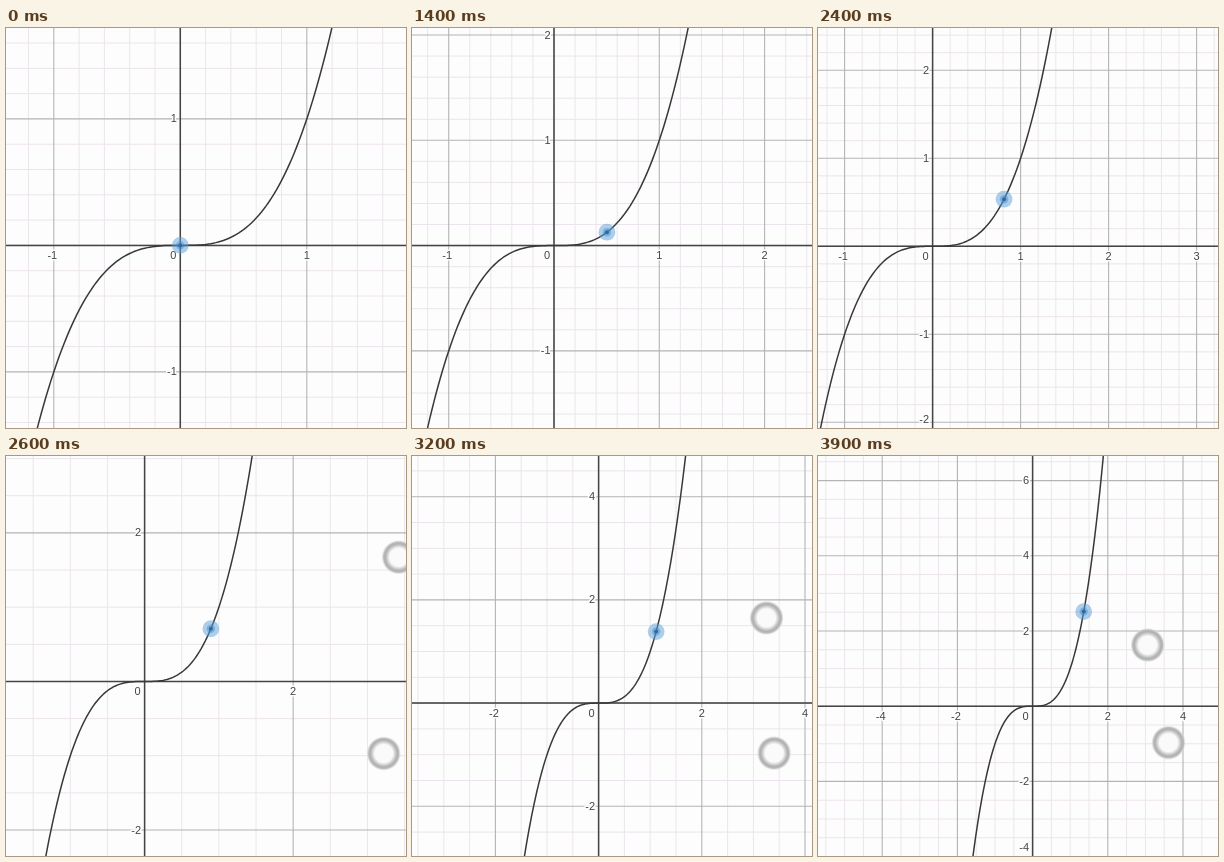
An HTML page with a canvas that plays this animation: 400 px wide and 400 px high, repeating every 4000 ms.

```html
<!DOCTYPE html>
<html lang="en">
<head>
<meta charset="utf-8">
<title>Cubic curve</title>
<style>
  html, body { margin: 0; width: 100%; height: 100%; overflow: hidden; background: #fdfdfd; }
  canvas { display: block; width: 400px; height: 400px; }
</style>
</head>
<body>
<canvas id="stage" width="400" height="400"></canvas>
<script>
const SIZE = 400, LOOP = 4000, STEP = 100, TOUCH_START = 2500;
const ctx = document.getElementById('stage').getContext('2d');

// time, origin x, origin y, pixels per unit, x of the moving point
const keys = [
  [0, 174.3, 217.4, 126.5, 0],
  [1200, 174.3, 217.4, 126.5, 0.42],
  [1400, 142, 217.6, 105.3, 0.503],
  [1600, 121.8, 217.9, 92.6, 0.567],
  [1800, 114.6, 218.3, 88, 0.63],
  [2400, 114.6, 218.3, 88, 0.812],
  [2800, 162.6, 232.6, 62.7, 0.972],
  [3200, 186.6, 247.1, 51.6, 1.115],
  [3500, 196.7, 250.6, 47.8, 1.197],
  [3900, 214.6, 250.2, 37.6, 1.36]
];

const mix = (a, b, k) => a + (b - a) * k;

function poseAt(t) {
  let i = 0;
  while (i < keys.length - 2 && t >= keys[i + 1][0]) i++;
  const a = keys[i], b = keys[i + 1];
  const k = Math.min(1, (t - a[0]) / (b[0] - a[0]));
  return {
    ox: mix(a[1], b[1], k),
    oy: mix(a[2], b[2], k),
    unit: a[3] * Math.pow(b[3] / a[3], k),
    px: mix(a[4], b[4], k)
  };
}

function line(x1, y1, x2, y2, color, width) {
  ctx.strokeStyle = color;
  ctx.lineWidth = width;
  ctx.beginPath();
  ctx.moveTo(x1, y1);
  ctx.lineTo(x2, y2);
  ctx.stroke();
}

const vertical = (x, color, width) => line(x, 0, x, SIZE, color, width);
const horizontal = (y, color, width) => line(0, y, SIZE, y, color, width);

// Calls visit(n) for every multiple n of gap that falls on the stage.
function eachTick(origin, gap, visit) {
  const last = Math.floor((SIZE + 10 - origin) / gap);
  for (let n = Math.ceil((-10 - origin) / gap); n <= last; n++) visit(n);
}

function disc(x, y, r, color) {
  ctx.fillStyle = color;
  ctx.beginPath();
  ctx.arc(x, y, r, 0, Math.PI * 2);
  ctx.fill();
}

function label(text, x, y, align) {
  ctx.textAlign = align;
  ctx.strokeStyle = '#fdfdfd';
  ctx.lineWidth = 3;
  ctx.strokeText(text, x, y);
  ctx.fillStyle = '#444';
  ctx.fillText(text, x, y);
}

function drawGrid({ ox, oy, unit }) {
  const major = unit >= 75 ? 1 : 2;
  const parts = major === 1 ? 5 : 4;
  const gap = major * unit, small = gap / parts;

  eachTick(ox, small, n => { if (n % parts) vertical(ox + n * small, '#ebe6ec', 1); });
  eachTick(oy, small, n => { if (n % parts) horizontal(oy + n * small, '#ece4ec', 1); });
  eachTick(ox, gap, n => vertical(ox + n * gap, '#b4b4b4', 1.1));
  eachTick(oy, gap, n => horizontal(oy + n * gap, '#b4b4b4', 1.1));
  vertical(ox, '#444', 1.5);
  horizontal(oy, '#444', 1.5);
  return { major, gap };
}

function drawLabels({ ox, oy }, { major, gap }) {
  ctx.font = '11px "Liberation Sans", Arial, sans-serif';
  ctx.textBaseline = 'middle';
  ctx.lineJoin = 'round';
  eachTick(ox, gap, n => {
    if (n) label(String(n * major), ox + n * gap - (n < 0 ? 1.5 : 0), oy + 10.5, 'center');
  });
  eachTick(oy, gap, n => {
    const y = Math.min(SIZE - 8, Math.max(7, oy + n * gap + 0.5));
    if (n) label(String(-n * major), ox - 3.5, y, 'right');
  });
  label('0', ox - 4, oy + 10.5, 'right');
}

function drawCurve({ ox, oy, unit }) {
  ctx.strokeStyle = '#383838';
  ctx.lineWidth = 1.5;
  ctx.beginPath();
  for (let x = -2.2; x <= 2.2; x += 0.02) ctx.lineTo(ox + x * unit, oy - x ** 3 * unit);
  ctx.stroke();
}

function drawPoint({ ox, oy, unit, px }) {
  const x = ox + px * unit, y = oy - px ** 3 * unit;
  disc(x, y, 8.4, 'rgba(90, 160, 215, 0.5)');
  disc(x, y, 4.2, 'rgba(65, 135, 200, 0.45)');
  disc(x, y, 2, '#32689f');
}

function drawTouch(x, y) {
  const glow = ctx.createRadialGradient(x, y, 9, x, y, 17.5);
  glow.addColorStop(0, '#fafafa');
  glow.addColorStop(0.3, '#cfcfcf');
  glow.addColorStop(0.52, '#b0b0b0');
  glow.addColorStop(0.72, '#bcbcbc');
  glow.addColorStop(1, 'rgba(235, 235, 235, 0)');
  disc(x, y, 17.5, glow);
}

// The two fingers stay almost fixed to the plane while it is pinched.
function drawTouches({ ox, oy, unit }, t) {
  const k = (t - 2800) / 1100;
  drawTouch(ox + mix(3.365, 3.06, k) * unit, oy - mix(1.665, 1.625, k) * unit);
  drawTouch(ox + mix(3.28, 3.615, k) * unit, oy + 0.97 * unit);
}

function draw(t) {
  const pose = poseAt(t);
  ctx.fillStyle = '#fdfdfd';
  ctx.fillRect(0, 0, SIZE, SIZE);
  const grid = drawGrid(pose);
  drawLabels(pose, grid);
  drawCurve(pose);
  drawPoint(pose);
  if (t >= TOUCH_START) drawTouches(pose, t);
}

const start = performance.now();
function tick() {
  const t = (performance.now() - start) % LOOP;
  draw(Math.floor(t / STEP) * STEP);
  requestAnimationFrame(tick);
}
tick();
</script>
</body>
</html>
```
